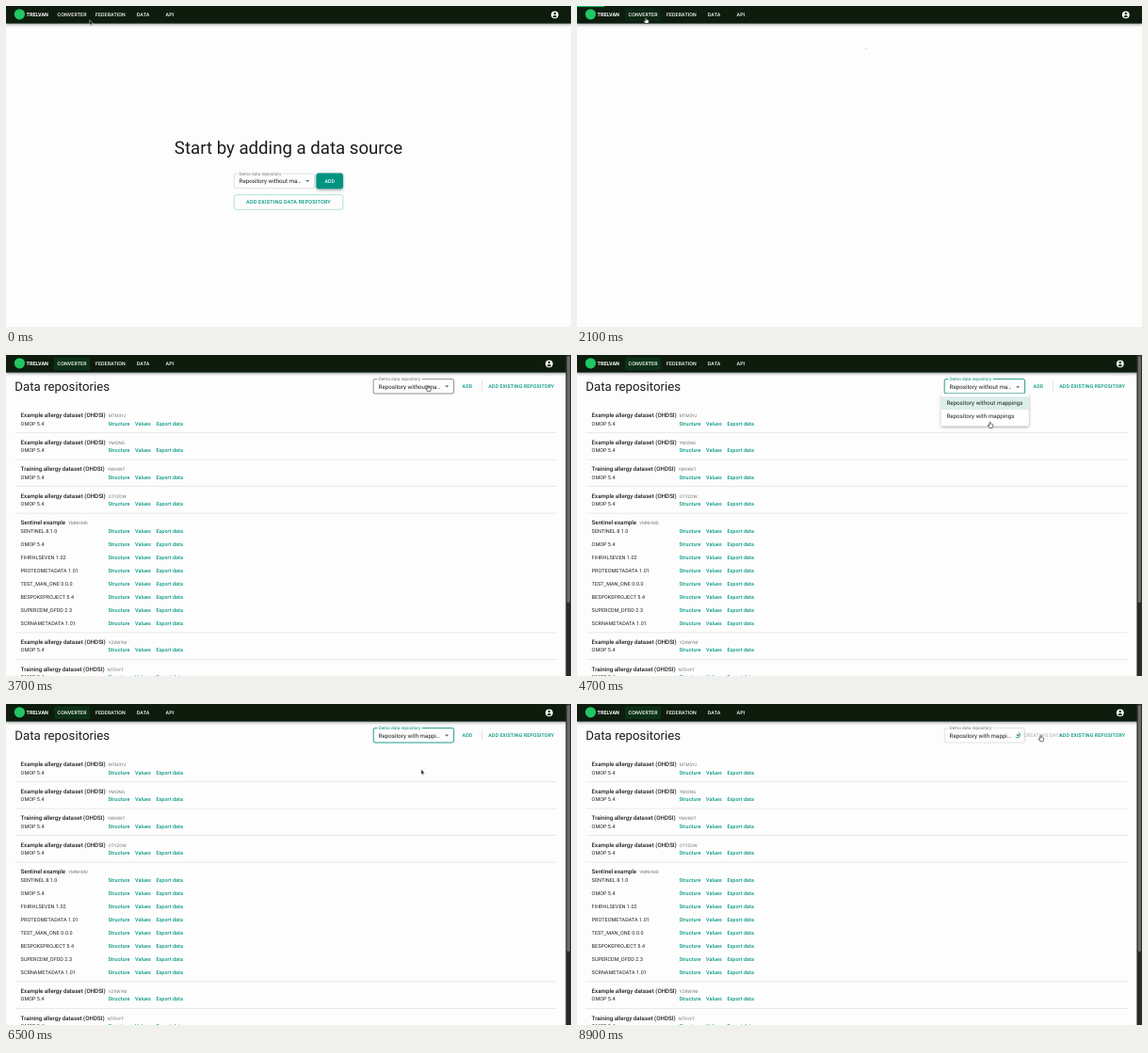
Write an HTML page that moves like this. It is 600 px wide and 341 px high and loops after 9 s.

```html
<!DOCTYPE html>
<html lang="en">
<head>
<meta charset="utf-8">
<title>Data repositories</title>
<style>
html, body { margin: 0; width: 100%; height: 100%; overflow: hidden; background: #fdfdfd; }
svg { display: block; width: 100%; height: 100%; }
text { font-family: Roboto, Arial, sans-serif; text-rendering: geometricPrecision; white-space: pre; }
</style>
</head>
<body>
<svg id="stage" viewBox="0 0 600 341" xmlns="http://www.w3.org/2000/svg">
  <defs>
    <filter id="shadow" x="-20%" y="-40%" width="140%" height="200%">
      <feDropShadow dx="0" dy="1.2" stdDeviation="1.4" flood-color="#000" flood-opacity=".38"/>
    </filter>
  </defs>
</svg>
<script>
(() => {
const LOOP = 9000, STEP = 100;
const TEAL = '#009681', FOCUS = '#0a937c', INK = '#202020', GREY = '#757575';
const stage = document.getElementById('stage');

function add(parent, tag, attrs, content) {
  const node = document.createElementNS('http://www.w3.org/2000/svg', tag);
  set(node, attrs);
  if (content !== undefined) node.textContent = content;
  parent.appendChild(node);
  return node;
}
function set(node, attrs) {
  for (const key in attrs) node.setAttribute(key, attrs[key]);
}
const group = (parent = stage) => add(parent, 'g', {});
const rect = (parent, x, y, width, height, fill, more = {}) =>
  add(parent, 'rect', { x, y, width, height, fill, ...more });
const label = (parent, x, y, size, content, fill = INK, more = {}) =>
  add(parent, 'text', { x, y, 'font-size': size, fill, ...more }, content);
const caps = (parent, x, y, content, fill, more = {}) =>
  label(parent, x, y, 5.3, content, fill, { 'font-weight': 500, 'letter-spacing': '.02em', ...more });
const show = (node, on) => node.setAttribute('opacity', +on);

// Outlined select with its label in a notch of the border
function makeSelect(parent, x, y, value) {
  const box = rect(parent, x, y, 85.4, 15.4, 'none', { rx: 1.8, stroke: '#c4c4c4', 'stroke-width': .5 });
  rect(parent, x + 4, y - 1, 47.5, 2, '#fdfdfd');
  const name = label(parent, x + 5.4, y + 1.6, 4.67, 'Demo data repository', GREY);
  const text = label(parent, x + 5.4, y + 9.9, 6.2, value);
  const arrow = add(parent, 'path', { fill: '#606060' });
  const flip = up => arrow.setAttribute('d',
    `M${x + 76} ${y + (up ? 8.8 : 6.9)}h4l-2 ${up ? -2 : 2}z`);
  flip(false);
  return { box, name, text, flip };
}

// Start page
const start = group();
label(start, 300, 157.4, 18.65, 'Start by adding a data source', '#1c1c1c', { 'text-anchor': 'middle' });
makeSelect(start, 242.2, 178.2, 'Repository without ma…');
rect(start, 329.4, 177.6, 28.6, 16.6, '#009480', { rx: 2.6, filter: 'url(#shadow)' });
caps(start, 343.8, 187.7, 'ADD', '#fff', { 'text-anchor': 'middle' });
rect(start, 242.2, 200.6, 115.6, 15.7, 'none', { rx: 2.4, stroke: '#86cdc1', 'stroke-width': .6 });
caps(start, 300, 210.4, 'ADD EXISTING DATA REPOSITORY', TEAL,
  { 'text-anchor': 'middle', 'font-size': 5.55, 'letter-spacing': '.027em' });

const loading = group();
rect(loading, 306, 44.7, 2, .7, '#c4c4c4');

// Repository list
const list = group();
label(list, 9.3, 37.8, 13.3, 'Data repositories', '#1c1c1c');
const allergy = kind => `${kind} allergy dataset (OHDSI)`;
const sentinelRows = ['SENTINEL 8.1.0', 'OMOP 5.4', 'FIHRHLSEVEN 1.02', 'PROTEOMETADATA 1.01',
  'TEST_MAN_ONE 0.0.0', 'BESPOKEPROJECT 5.4', 'SUPERCDM_DFDD 2.3', 'SCRNAMETADATA 1.01'];
const repos = [
  [allergy('Example'), 'MTM3YJ'],
  [allergy('Example'), 'YMI2NG'],
  [allergy('Training'), 'YMVKNT'],
  [allergy('Example'), 'OTYZOW'],
  ['Sentinel example', 'YMNHMD', sentinelRows],
  [allergy('Example'), 'YZKWYM'],
  [allergy('Training'), 'NTFHYT']
];
let headY = 64;
for (const [title, code, rows = ['OMOP 5.4']] of repos) {
  const head = label(list, 15.6, headY + 2.2, 6.2, title, INK, { 'font-weight': 500 });
  add(head, 'tspan', { dx: 3, 'font-size': 4.67, 'font-weight': 400, fill: GREY }, code);
  rows.forEach((row, i) => {
    const y = headY + 10.5 + i * 14.05;
    label(list, 15.6, y, 5.44, row, INK, { 'letter-spacing': '.01em' });
    [[108.4, 'Structure'], [137, 'Values'], [159.4, 'Export data']].forEach(([x, name]) =>
      label(list, x, y, 5.44, name, TEAL, { 'letter-spacing': '.01em', 'font-weight': 500 }));
  });
  const height = 28.5 + (rows.length - 1) * 14.05;
  rect(list, 9.5, headY + height - 10.2, 575, .5, '#d4d4d4');
  headY += height;
}
const select = makeSelect(list, 390.2, 25.6, '');
const addHover = rect(list, 478.5, 25.5, 23, 15.6, TEAL, { rx: 1.8, 'fill-opacity': .07 });
const addText = caps(list, 490, 35, 'ADD', TEAL, { 'text-anchor': 'middle' });
const divider = rect(list, 505.2, 27.5, .5, 11.5, '#cfcfcf');
const busy = group(list);
caps(busy, 474.2, 35, 'CREATING DATA', '#bcbcbc');
const spinner = add(busy, 'circle', { cx: 467.8, cy: 33, r: 2.8, fill: 'none', stroke: TEAL,
  'stroke-width': .75, 'stroke-dasharray': '10 8' });
caps(list, 512.2, 35, 'ADD EXISTING REPOSITORY', TEAL);

// Drop-down menu
const menu = group();
rect(menu, 386.8, 41.3, 93, 34, '#fff', { rx: 1.6, filter: 'url(#shadow)' });
const hover = rect(menu, 386.8, 58.2, 93, 14, '#f3f3f3');
const picked = rect(menu, 386.8, 44.2, 93, 14, '#dceeea');
['Repository without mappings', 'Repository with mappings'].forEach((name, i) =>
  label(menu, 392.4, 53.3 + i * 14.1, 6.2, name, INK, { 'letter-spacing': '.005em' }));

// App bar
const bar = group();
rect(bar, 0, 0, 600, 18.6, '#0a1e0d', { filter: 'url(#shadow)' });
const active = rect(bar, 51, 2.5, 38, 13.5, '#0b9a55', { rx: 1.6 });
add(bar, 'circle', { cx: 14.4, cy: 8.8, r: 5.6, fill: '#20c763' });
label(bar, 21.6, 10.9, 5.5, 'TRELVAN', '#fff', { 'font-weight': 700 });
[[54.6, 'CONVERTER'], [94.9, 'FEDERATION'], [138.8, 'DATA'], [169.5, 'API']].forEach(([x, name]) =>
  caps(bar, x, 11.3, name, '#fff'));
const avatar = group(bar);
add(avatar, 'circle', { r: 3.9, fill: '#fff' });
add(avatar, 'circle', { cy: -1.3, r: 1.2, fill: '#0a1e0d' });
add(avatar, 'path', { d: 'M-2.4 1.7Q0-.3 2.4 1.7Q0 4.3-2.4 1.7z', fill: '#0a1e0d' });
const progress = rect(bar, 0, 0, 0, 1.1, '#19b35c');

const scrollbar = group();
rect(scrollbar, 594.4, 0, 5.6, 341, '#2b2b2b');
rect(scrollbar, 595.7, 1, 3.2, 262, '#6c6c6c', { rx: 1.6 });

const ripple = add(stage, 'circle', { fill: TEAL });

// Pointers, both with the tip at 0,0
const pointer = group();
const arrowShape = add(pointer, 'path', { d: 'M0 0V5.4L1.2 4.3L2 6.1L2.9 5.7L2.1 4H3.8z',
  fill: '#111', stroke: '#fff', 'stroke-width': .45 });
const handShape = add(pointer, 'path', {
  d: 'M-.6.5Q0-.4.6.5V2.2Q1.2 1.8 1.6 2.4Q2.2 2.1 2.5 2.7Q3.2 2.6 3.2 3.4V4.6Q3.1 5.5 2.6 6.3H-.6Q-1.2 5.2-2.2 4Q-2.3 3.1-1.4 3.4L-.6 4z',
  fill: '#fff', stroke: '#111', 'stroke-width': .6, 'stroke-linejoin': 'round' });

// time, x, y
const path = [
  [0, 88.8, 14.8], [700, 73, 12.2], [2700, 73, 12.2], [3100, 426, 44], [3200, 426, 44],
  [3700, 448, 32.4], [4300, 448, 32.4], [4700, 438.6, 71], [6400, 438.6, 71], [7200, 492.4, 33.4]
];
const clamp = v => Math.max(0, Math.min(1, v));
const ramp = (t, from, to) => clamp((t - from) / (to - from));
const ease = v => v * v * (3 - 2 * v);

function pointerAt(t) {
  const i = path.findIndex(p => p[0] > t);
  if (i < 0) return path[path.length - 1].slice(1);
  const [t0, x0, y0] = path[i - 1], [t1, x1, y1] = path[i];
  const k = ease(ramp(t, t0, t1));
  return [x0 + (x1 - x0) * k, y0 + (y1 - y0) * k];
}

// time, x, y, radius
const clicks = [[4200, 448, 33, 0], [5600, 438, 65, 6], [8200, 490, 33, 9]];

function render(t) {
  const listed = t >= 2300;
  show(start, t < 2000);
  show(loading, t >= 2000 && !listed);
  show(list, listed);
  show(scrollbar, listed);
  avatar.setAttribute('transform', `translate(${listed ? 576.8 : 582.8} 9.3)`);
  show(active, listed ? .16 : .08 * ramp(t, 200, 600));

  const loaded = t < 2000 ? 0 : t < 2300 ? 14 + (t - 2000) * .15 : 300 + (t - 2300) * 3;
  progress.setAttribute('width', t < 2500 ? loaded : 0);

  const [x, y] = pointerAt(t);
  const onNav = y < 17 && x < 87;
  const onSelect = x > 390 && x < 475.6 && y > 25.5 && y < 41;
  const onAdd = x > 479 && x < 501 && y > 25.5 && y < 41;
  const open = t >= 4300 && t < 6000;
  const hand = onNav || onSelect || onAdd || (open && y > 43);
  pointer.setAttribute('transform', `translate(${x} ${y})`);
  show(arrowShape, !hand);
  show(handShape, hand);

  const creating = t >= 8300;
  const focused = t >= 4300 && !creating;
  const chosen = t >= 5700;
  set(select.box, {
    stroke: focused ? FOCUS : onSelect ? '#222' : '#c4c4c4',
    'stroke-width': focused ? .9 : .5
  });
  select.name.setAttribute('fill', focused ? FOCUS : GREY);
  select.text.textContent = chosen ? 'Repository with mappi…' : 'Repository without ma…';
  select.flip(open && !chosen);

  show(menu, t < 5800 ? ramp(t, 4200, 4500) : 1 - ramp(t, 5800, 6000));
  show(hover, ramp(t, 4700, 4900));
  picked.setAttribute('y', chosen ? 58.2 : 44.2);

  show(addHover, onAdd && !creating);
  show(addText, !creating);
  show(divider, !creating);
  show(busy, creating);
  spinner.setAttribute('transform', `rotate(${t * .257 + 160} 467.8 33)`);

  const click = clicks.find(c => t >= c[0] && t < c[0] + 300);
  show(ripple, click ? .14 * (1 - (t - click[0]) / 300) : 0);
  if (click) set(ripple, { cx: click[1], cy: click[2], r: click[3] * ramp(t, click[0] - 100, click[0] + 200) });
}

const began = performance.now();
function frame() {
  const t = (performance.now() - began) % LOOP;
  render(Math.floor(t / STEP) * STEP);
  requestAnimationFrame(frame);
}
frame();
})();
</script>
</body>
</html>
```
